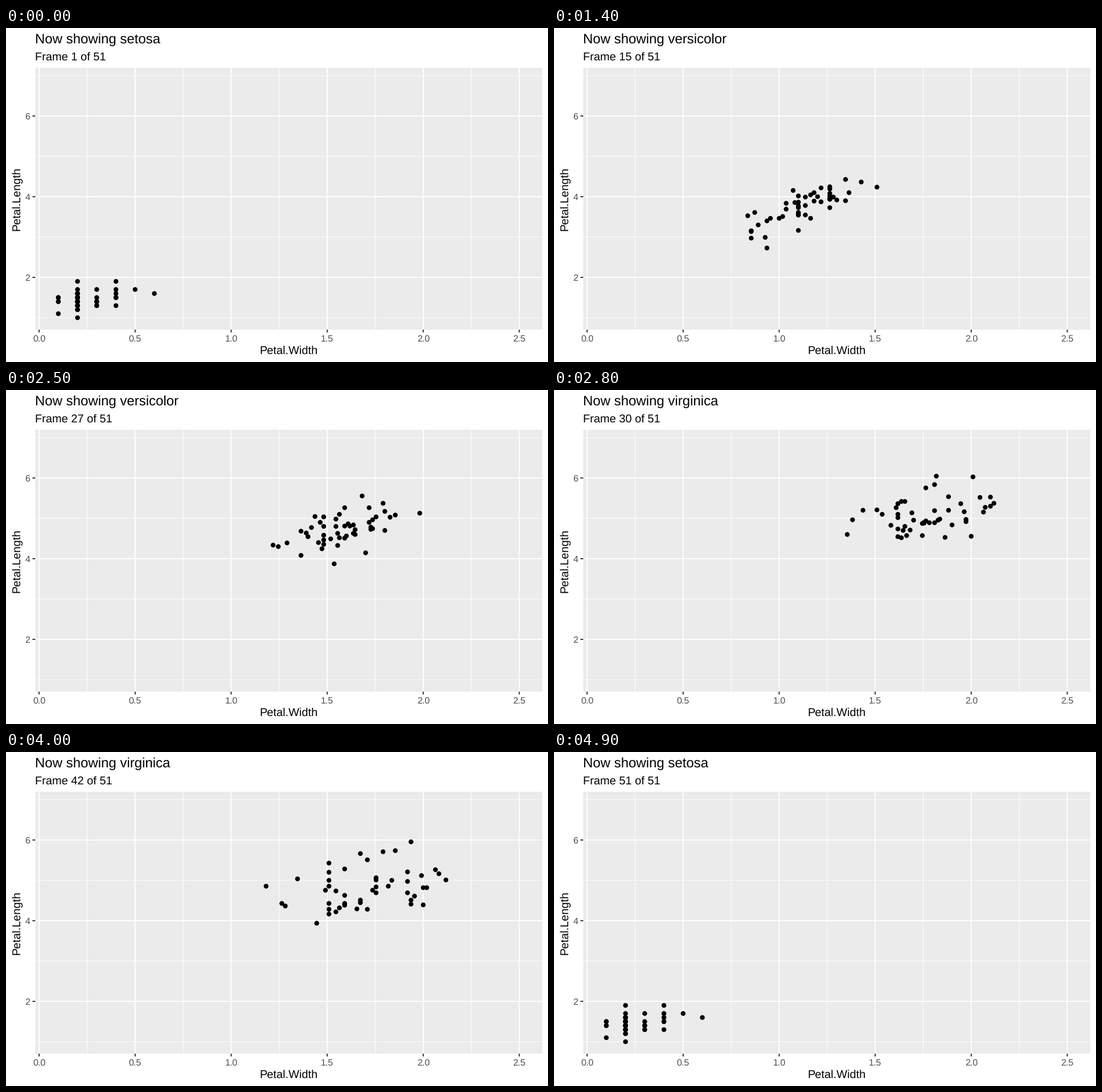
Animation of 952x588 px, one loop 5 s. Source, as a matplotlib script:

```python
import matplotlib.pyplot as plt
import numpy as np
from matplotlib.animation import FuncAnimation
from matplotlib.patches import Rectangle

WIDTH, HEIGHT, DPI = 952, 588, 100
FRAMES, INTERVAL = 50, 100
LABELS = 51                  # numbered poses, one more than the frames shown
CYCLE, HOLD = 17, 6          # poses per species, poses at rest
LEFT, RIGHT, TOP, BOTTOM = 51.4, 942.0, 70.0, 531.0
X_MIN, X_MAX = -0.02, 2.62
Y_MIN, Y_MAX = 0.705, 7.195
POINT_DIAMETER = 8.4
MAJOR, MINOR = 1.94, 0.97

plt.rcParams["font.family"] = "Liberation Sans"
plt.rcParams["text.hinting"] = "none"
plt.rcParams["text.hinting_factor"] = 1

# Iris petal measurements in millimetres, in data set order.
setosa_length = [
    14, 14, 13, 15, 14, 17, 14, 15, 14, 15, 15, 16, 14, 11, 12, 15, 13,
    14, 17, 15, 17, 15, 10, 17, 19, 16, 16, 15, 14, 16, 16, 15, 15, 14,
    15, 12, 13, 14, 13, 15, 13, 13, 13, 16, 19, 14, 16, 14, 15, 14]
setosa_width = [
    2, 2, 2, 2, 2, 4, 3, 2, 2, 1, 2, 2, 1, 1, 2, 4, 4,
    3, 3, 3, 2, 4, 2, 5, 2, 2, 4, 2, 2, 2, 2, 4, 1, 2,
    2, 2, 2, 1, 2, 2, 3, 3, 2, 6, 4, 3, 2, 2, 2, 2]
versicolor_length = [
    47, 45, 49, 40, 46, 45, 47, 33, 46, 39, 35, 42, 40, 47, 36, 44, 45,
    41, 45, 39, 48, 40, 49, 47, 43, 44, 48, 50, 45, 35, 38, 37, 39, 51,
    45, 45, 47, 44, 41, 40, 44, 46, 40, 33, 42, 42, 42, 43, 30, 41]
versicolor_width = [
    14, 15, 15, 13, 15, 13, 16, 10, 13, 14, 10, 15, 10, 14, 13, 14, 15,
    10, 15, 11, 18, 13, 15, 12, 13, 14, 14, 17, 15, 10, 11, 10, 12, 16,
    15, 16, 15, 13, 13, 13, 12, 14, 12, 10, 13, 12, 13, 13, 11, 13]
virginica_length = [
    60, 51, 59, 56, 58, 66, 45, 63, 58, 61, 51, 53, 55, 50, 51, 53, 55,
    67, 69, 50, 57, 49, 67, 49, 57, 60, 48, 49, 56, 58, 61, 64, 56, 51,
    56, 61, 56, 55, 48, 54, 56, 51, 51, 59, 57, 52, 50, 52, 54, 51]
virginica_width = [
    25, 19, 21, 18, 22, 21, 17, 18, 18, 25, 20, 19, 21, 20, 24, 23, 18,
    22, 23, 15, 23, 20, 20, 18, 21, 18, 18, 18, 21, 16, 19, 20, 22, 15,
    14, 23, 24, 18, 18, 21, 24, 23, 19, 23, 25, 23, 19, 20, 23, 18]


def x_px(value):
    return LEFT + (value - X_MIN) / (X_MAX - X_MIN) * (RIGHT - LEFT)


def y_px(value):
    return BOTTOM - (value - Y_MIN) / (Y_MAX - Y_MIN) * (BOTTOM - TOP)


def petals(width, length):
    """Pixel positions of one species."""
    return np.column_stack([x_px(np.array(width) / 10),
                            y_px(np.array(length) / 10)])


SPECIES = ["setosa", "versicolor", "virginica"]
POSITIONS = [petals(setosa_width, setosa_length),
             petals(versicolor_width, versicolor_length),
             petals(virginica_width, virginica_length)]

fig = plt.figure(figsize=(WIDTH / DPI, HEIGHT / DPI), dpi=DPI, facecolor="white")
ax = fig.add_axes([0, 0, 1, 1])
ax.set_xlim(0, WIDTH)
ax.set_ylim(HEIGHT, 0)
ax.axis("off")


def points(pixels):
    return pixels * 72 / DPI


def line(xs, ys, width, color="white", z=2):
    ax.plot(xs, ys, color=color, lw=points(width), solid_capstyle="butt",
            snap=False, zorder=z)


def text(x, y, label, size, color="black", **options):
    options.setdefault("va", "baseline")
    return ax.text(x, y, label, fontsize=points(size), color=color, **options)


ax.add_patch(Rectangle((LEFT, TOP), RIGHT - LEFT, BOTTOM - TOP,
                       facecolor="#EBEBEB", lw=0, snap=False, zorder=0))

for value in np.arange(0.25, 2.5, 0.5):
    line([x_px(value)] * 2, [TOP, BOTTOM], MINOR, z=1)
for value in (1, 3, 5, 7):
    line([LEFT, RIGHT], [y_px(value)] * 2, MINOR, z=1)

for value in np.arange(0, 2.6, 0.5):
    x = x_px(value)
    line([x, x], [TOP, BOTTOM], MAJOR)
    line([x, x], [BOTTOM, BOTTOM + 5], MAJOR, "#333333")
    text(x, 551.5, f"{value:.1f}", 16, "#4D4D4D", ha="center")
for value in (2, 4, 6):
    y = y_px(value)
    line([LEFT, RIGHT], [y, y], MAJOR)
    line([LEFT - 5, LEFT], [y, y], MAJOR, "#333333")
    text(LEFT - 9, y + 5.7, str(value), 16, "#4D4D4D", ha="right")

text((LEFT + RIGHT) / 2, 573.8, "Petal.Width", 20, ha="center")
text(24.6, (TOP + BOTTOM) / 2, "Petal.Length", 20, ha="right", va="center",
     rotation=90, rotation_mode="default").set(
         rotation_mode="anchor", ha="center", va="baseline")

title = text(LEFT, 27.2, "", 24)
subtitle = text(LEFT, 56.8, "", 20)
dots = ax.scatter(*POSITIONS[0].T, s=np.full(50, points(POINT_DIAMETER) ** 2),
                  c="black", edgecolors="none", linewidths=0, zorder=3)


def update(frame):
    number = 1 + round(frame * (LABELS - 1) / (FRAMES - 1))
    stage, step = divmod(number, CYCLE)
    progress = max(0, step - HOLD) / (CYCLE - HOLD)
    current, following = stage % 3, (stage + 1) % 3

    closest = following if progress > 0.5 else current
    title.set_text(f"Now showing {SPECIES[closest]}")
    subtitle.set_text(f"Frame {number} of {LABELS}")
    dots.set_offsets((1 - progress) * POSITIONS[current]
                     + progress * POSITIONS[following])
    return title, subtitle, dots


animation = FuncAnimation(fig, update, frames=FRAMES, interval=INTERVAL,
                          repeat=True, repeat_delay=0, blit=False)
plt.show()
```
